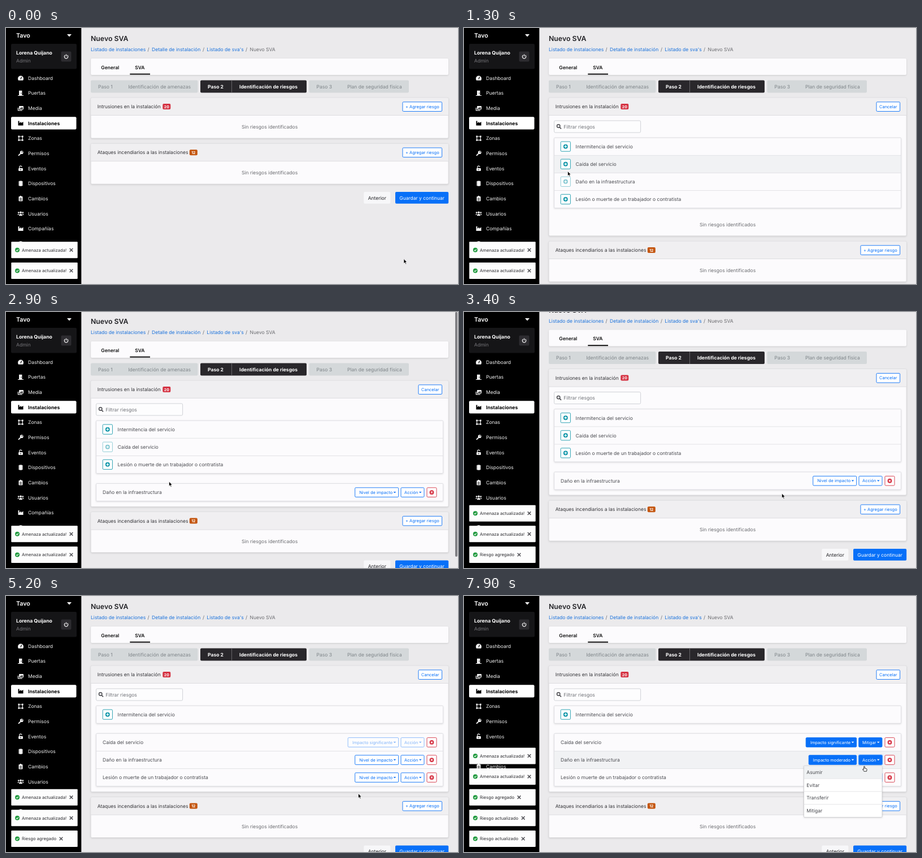
Animation of 800x453 px, one loop 8000 ms. Source, as an HTML page:

```html
<!DOCTYPE html>
<html lang="es">
<head>
<meta charset="utf-8">
<title>Nuevo SVA</title>
<style>
  html, body { margin: 0; width: 100%; height: 100%; overflow: hidden; background: #ebeaec; }
  svg { display: block; }
  text { font-family: Inter, "Open Sans", sans-serif; text-rendering: geometricPrecision; white-space: pre; }
  .b { font-weight: 700; }
  .sb { font-weight: 600; }
  .mid { text-anchor: middle; }
  .end { text-anchor: end; }
  .card { filter: drop-shadow(0 1px 1.5px rgba(0, 0, 0, .13)); }
  .line { fill: none; stroke: currentColor; stroke-width: 1.2; }
</style>
</head>
<body>
<svg width="800" height="453" viewBox="0 0 800 453">
  <g id="main"></g>
  <g id="side"></g>
  <g id="toasts"></g>
  <g id="cursor"></g>
</svg>
<script>
const LOOP = 8000, STEP = 100;
const BLUE = '#0870f8', TEAL = '#1699ab', RED = '#d53343', INK = '#3c3c40', GRAY = '#6b6c70';
const ROW = 31.1, ITEM = 22.8, LIST_TOP = 194.2;

// Drawing helpers; y of text is the middle of its capitals
const txt = (x, y, s, fill = INK, size = 8.55, cls = '') =>
  `<text x="${x}" y="${y + size * .36}" font-size="${size}" fill="${fill}" class="${cls}">${s}</text>`;
const rect = (x, y, w, h, fill, r = 0, more = '') =>
  `<rect x="${x}" y="${y}" width="${w}" height="${h}" rx="${r}" fill="${fill}" ${more}/>`;
const path = (d, more = '') => `<path d="${d}" ${more}/>`;
const stroke = (c, w = 1) => `stroke="${c}" stroke-width="${w}"`;
const hline = (x, y, w, c = '#dddde1') => rect(x, y - .4, w, .8, c);
const at = (x, y, s, color = '#fff') =>
  `<g transform="translate(${x} ${y})" fill="${color}" color="${color}">${s}</g>`;
const dot = (x, y, r) => `<circle cx="${x}" cy="${y}" r="${r}"/>`;
const cross = (r, c, w) => path(`M${-r} ${-r}L${r} ${r}M${r} ${-r}L${-r} ${r}`, `fill="none" ${stroke(c, w)}`);

// ---- Sidebar ----
const plant = path('M-4.5-4h2v3.8L.8-2.5v2.3l3.7-2.3V4h-9z');
const icons = {
  gauge: path('M-5 1a5 5 0 0 1 10 0q0 2-.9 3.2h-8.2Q-5 3-5 1z') + path('M-.2 2L1.7-2', stroke('#000', 1.2)),
  door: path('M-3-4.6h5.4v8.4H5v1H-5v-1h2z') + rect(.4, -.4, 1, 1.3, '#000'),
  media: path('M-4.6-1v5h7.4', 'class="line"') + rect(-3, -4, 8, 6.3, 'currentColor', 1) +
    path('M-1.8 1.2L0-1l1 1 1.6-2 1.5 3.2z', 'fill="#000"'),
  plant,
  zone: path('M-3.2-3.2h6.4v6.4h-6.4z', 'class="line"') +
    [[-4.6, -4.6], [2, -4.6], [-4.6, 2], [2, 2]].map(p => rect(...p, 2.6, 2.6, 'currentColor')).join(''),
  key: dot(1.7, -1.7, 2.9) + path('M0 0L-4 4', 'class="line" style="stroke-width:2"') +
    `<circle cx="2.5" cy="-2.5" r=".9" fill="#000"/>`,
  lock: rect(-3.9, -.4, 7.8, 5, 'currentColor', 1) + path('M-2.2 0v-2a2.1 2.1 0 0 1 4.2-.6', 'class="line"') +
    rect(-.6, 1.2, 1.2, 1.8, '#000'),
  chip: rect(-2.7, -4.6, 5.4, 9.2, 'currentColor', 1) +
    path('M-4-3h8M-4-1h8M-4 1h8M-4 3h8', 'class="line" style="stroke-width:1"'),
  board: rect(-3.5, -3.8, 7, 8.6, 'currentColor', 1) + dot(0, -3.8, 1.3) +
    path('M-1.8-.6h3.6M-1.8 1.2h3.6M-1.8 3h3.6', stroke('#000', .8)),
  users: dot(0, -2, 1.9) + dot(-3.8, -1.8, 1.3) + dot(3.8, -1.8, 1.3) +
    path('M-3 3.8Q-3 .6 0 .6t3 3.2zM-5.6 2.4Q-5.4 0-3 .2l-.8 2.2zM5.6 2.4Q5.4 0 3 .2l.8 2.2z'),
  round: dot(0, 0, 4.6)
};
const menu = [['gauge', 'Dashboard'], ['door', 'Puertas'], ['media', 'Media'], ['plant', 'Instalaciones'],
  ['zone', 'Zonas'], ['key', 'Permisos'], ['lock', 'Eventos'], ['chip', 'Dispositivos'],
  ['board', 'Cambios'], ['users', 'Usuarios'], ['plant', 'Compañías'], ['round', '']];

function sidebar() {
  let s = rect(0, 0, 133.3, 453, '#000') +
    txt(18, 13.2, 'Tavo', '#fff', 10.7, 'sb') + path('M108 11h8l-4 4.4z', 'fill="#fff"') +
    rect(9, 28, 116, 44.5, '#151517', 2) +
    txt(18, 44, 'Lorena Quijano', '#fff', 8.7, 'b') + txt(18, 57.5, 'Admin', '#77767b') +
    rect(97.5, 41.5, 18, 18, '#2d2c30', 2) +
    at(106.5, 50.5, path('M-1.9-2.4a3.2 3.2 0 1 0 3.8 0M0-4v3.8', 'class="line"'));
  menu.forEach(([icon, label], i) => {
    const y = 88.6 + 26.65 * i, on = i === 3, c = on ? '#000' : '#f2f2f2';
    if (on) s += rect(9, y - 11.4, 115.5, 22.4, '#fff', 2);
    s += at(26, y, icons[icon], c) + txt(39, y, label, c, on ? 8.65 : 8.55, on ? 'b' : '');
  });
  return s;
}

const toastKinds = [['Amenaza actualizada!', 115.5], ['Riesgo agregado', 97.5], ['Riesgo actualizado', 104.7]];
const toastOrder = [0, 0, 1, 2, 2];

function toasts(n) {
  return toastOrder.slice(0, n).map((k, i) => {
    const y = 429.5 - (n - 1 - i) * 36.65, [label, x] = toastKinds[k];
    return rect(9.3, y - 14.5, 117.4, 29, '#fdfdfd', 1) +
      at(20, y, dot(0, 0, 4) + path('M-2 .1L-.5 1.5 2-1.2', `fill="none" ${stroke('#fff', 1.1)}`), '#219a3f') +
      txt(28, y, label, '#2c2c30', 7.65) + at(x, y, cross(2.8, '#505055', 1.5));
  }).join('');
}

// ---- Timeline ----
const risks = ['Intermitencia del servicio', 'Caída del servicio', 'Daño en la infraestructura',
  'Lesión o muerte de un trabajador o contratista'];
const impacts = ['insignificante', 'menor', 'moderado', 'significante', 'catastrófico'].map(s => 'Impacto ' + s);
const actions = ['Asumir', 'Evitar', 'Transferir', 'Mitigar'];
const OPEN = 700;
const addedAt = [Infinity, 4100, 1500, 4500];
const saving = [[1200, 1500, 2], [2700, 3200, 1], [3900, 4100, 1], [4300, 4500, 3]];
const menus = [[4700, 5100, 1, 'impact'], [5600, 6100, 1, 'action'], [6600, 7100, 2, 'impact'], [7700, 8000, 2, 'action']];
const picks = { impact: { 1: [5100, 5300, impacts[3]], 2: [7100, 7300, impacts[2]] },
  action: { 1: [6100, 6300, 'Mitigar'] } };
const toastAt = [0, 0, 3000, 5500, 6300];
const scrollKeys = [[0, 0], [2700, 0], [2900, 2], [3200, 22.4], [3400, 22.4], [3600, 0]];
const mouseKeys = [[0, 704, 408.5], [200, 704, 400], [600, 742, 140], [800, 742, 140], [1100, 180, 272],
  [1200, 180, 272], [1300, 183.5, 253.5], [1700, 181, 241], [2700, 181, 241], [2900, 288.5, 300],
  [3400, 562.5, 321], [3600, 500, 305], [3900, 180, 241], [4300, 181, 241], [4650, 656, 259], [4750, 656, 259],
  [5100, 623.5, 349.5], [5200, 623.5, 349.5], [5500, 719, 259], [5700, 719, 260], [6000, 690, 349],
  [6150, 690, 349], [6400, 680.5, 289.5], [6650, 680, 290], [6950, 650, 357], [7100, 650, 357],
  [7500, 712, 290], [7750, 712, 290], [7900, 708.5, 301.2]];

function along(keys, t) {
  const i = keys.findIndex(k => k[0] > t);
  if (i < 0) return keys[keys.length - 1].slice(1);
  const a = keys[i - 1], b = keys[i], p = (t - a[0]) / (b[0] - a[0]), e = p * p * (3 - 2 * p);
  return a.slice(1).map((v, j) => v + (b[j + 1] - v) * e);
}
const during = (list, t) => list.find(([from, to]) => t >= from && t < to);

// ---- Main area ----
let mx, my, hand;
const over = (x, y, w, h) => mx >= x && mx < x + w && my >= y && my < y + h;
const link = (x, y, w, h) => { const o = over(x, y, w, h); hand = hand || o; return o; };

function button(x, y, w, label) {
  const o = link(x, y - 8.3, w, 16.6);
  return rect(x, y - 8.3, w, 16.6, o ? BLUE : '#fff', 1.5, stroke(BLUE, .9)) +
    txt(x + w / 2, y, label, o ? '#fff' : BLUE, 7.5, 'mid');
}

const widths = { 'Nivel de impacto': 77, [impacts[2]]: 84.5, [impacts[3]]: 89.5, 'Acción': 41, 'Mitigar': 41.3 };

function select(right, y, label, solid, dim, focus, covered) {
  const w = widths[label], x = right - w;
  const on = solid || focus || (!covered && !dim && link(x, y - 8.3, w, 16.6));
  const c = on ? '#fff' : BLUE;
  return `<g opacity="${dim ? .5 : 1}">` +
    (focus ? rect(x - 1.5, y - 9.8, w + 3, 19.6, '#9cc6fb', 3) : '') +
    rect(x, y - 8.3, w, 16.6, on ? BLUE : '#fff', 1.5, stroke(BLUE, .9)) +
    txt(right - 10.6, y, label, c, 7.45, 'end') +
    path(`M${right - 9} ${y - 1.2}h4.6l-2.3 2.5z`, `fill="${c}"`) + '</g>';
}

function panel(y, h, title, badge, bx, color) {
  return `<g class="card">${rect(150.2, y, 632.8, h, '#fcfbfd', 2, stroke('#d9d9dc', .7))}</g>` +
    rect(150.5, y + .3, 632.2, 31, '#f0eff1', 2) + hline(150.2, y + 31.2, 632.8, '#d9d9dc') +
    txt(161.7, y + 15.8, title, '#333337') + rect(bx, y + 10.6, 14, 10, color, 2) +
    txt(bx + 7, y + 15.7, badge, '#fff', 6.8, 'b mid');
}

const listBox = (y, n) => `<g class="card">${rect(159.6, y, 614, n * ROW, '#fcfbfd', 1.5, stroke('#d9d9dd', .8))}</g>`;
const rowBack = (y, i, hover) => (hover ? rect(160, y + .4, 613.2, ROW - .8, '#f1f2f4') : '') +
  (i ? hline(159.6, y, 614) : '');

function catalog(t, rows) {
  const busy = during(saving, t);
  let s = rect(159.6, 164, 153, 21, '#fdfdfe', 2, stroke('#cacdd2', .9)) +
    at(168, 174.3, `<circle cx="-.8" cy="-.8" r="2.7" class="line" style="stroke-width:1.5"/>` +
      path('M1.2 1.2L4 4', 'class="line" style="stroke-width:1.7"'), '#4a4a4f') +
    txt(176.3, 174.6, 'Filtrar riesgos', '#707277') + listBox(LIST_TOP, rows.length);
  rows.forEach((r, i) => {
    const y = LIST_TOP + i * ROW, c = y + ROW / 2, dim = busy && busy[2] === r;
    link(171, c - 9, 17.6, 17.6);
    s += rowBack(y, i, over(160, y, 613, ROW)) + `<g opacity="${dim ? .5 : 1}">` +
      rect(171.2, c - 8.7, 17.2, 17.2, '#fff', 1.5, stroke(TEAL, .9)) +
      at(179.8, c - .1, dot(0, 0, 4) + path('M-2.3 0h4.6M0-2.3v4.6', stroke('#fff', 1.3)), TEAL) + '</g>' +
      txt(197.6, c + .2, risks[r], '#4a4b50');
  });
  return s;
}

function chosen(t, rows, top, open) {
  let s = listBox(top, rows.length);
  rows.forEach((r, i) => {
    const y = top + i * ROW, c = y + ROW / 2 + .1;
    const made = kind => { const p = picks[kind][r]; return p && t >= p[0] ? p : null; };
    const im = made('impact'), ac = made('action');
    const dim = [im, ac].some(p => p && t < p[1]);
    const focus = kind => open && open[2] === r && open[3] === kind;
    s += rowBack(y, i, open ? open[2] === r : over(160, y, 613, ROW)) +
      txt(171, c, risks[r], '#4a4b50') +
      select(694.7, c, im ? im[2] : 'Nivel de impacto', im && t >= im[1], dim, focus('impact'), open) +
      select(740, c, ac ? ac[2] : 'Acción', ac && t >= ac[1], dim, focus('action'), open) +
      rect(745, c - 8.3, 17, 16.6, '#fff', 1.5, stroke(RED, .9)) +
      at(753.5, c, dot(0, 0, 3.9) + cross(1.4, '#fff', 1.2), RED);
  });
  return s;
}

function dropdown(kind, c) {
  const items = kind === 'impact' ? impacts : actions, x = kind === 'impact' ? 556.2 : 601.5, y = c + 10.4;
  let s = `<g class="card">${rect(x, y, 138.5, items.length * ITEM, '#fff', 1.5, stroke('#c8c8cc', .8))}</g>`;
  items.forEach((label, i) => {
    const iy = y + i * ITEM;
    if (link(x, iy, 138.5, ITEM)) s += rect(x + .4, iy + .4, 137.7, ITEM - .8, '#eff1f3');
    if (i) s += hline(x, iy, 138.5);
    s += txt(x + 4.8, iy + ITEM / 2, label, '#47484d');
  });
  return s;
}

function heading() {
  const crumbs = [[150, 'Listado de instalaciones'], [258, 'Detalle de instalación'], [355.3, "Listado de sva's"]];
  const step = (x, w, n, nx, label, lx, on) => {
    const c = on ? '#fff' : '#7e8488', cls = on ? 'b' : '';
    return rect(x, 92.5, w, 22, on ? '#29272b' : '#d4d8da', 2) +
      txt(nx, 103.7, 'Paso ' + n, c, 8.55, cls) + txt(lx, 103.7, label, c, 8.55, cls);
  };
  return txt(150, 18.6, 'Nuevo SVA', '#222226', 12.3, 'sb') +
    crumbs.map(([x, s]) => txt(x, 38.3, s, '#1a72dc')).join('') +
    [250.6, 348, 424].map(x => txt(x, 38.3, '/', GRAY)).join('') + txt(431.6, 38.3, 'Nuevo SVA', GRAY) +
    `<g class="card">${rect(150.2, 54, 632.8, 29, '#fcfbfd', 2)}</g>` +
    txt(168.3, 69.7, 'General', '#111', 8.5, 'sb') + txt(228.3, 69.7, 'SVA', '#111', 8.5, 'sb') +
    rect(219.3, 80.6, 35.7, 2, '#111') +
    step(150, 189.5, 1, 163, 'Identificación de amenazas', 216.3) +
    step(344, 188, 2, 357, 'Identificación de riesgos', 413, true) + rect(399, 92.5, .8, 22, '#77757a') +
    step(536.5, 176.5, 3, 549.5, 'Plan de seguridad física', 604);
}

function page(t) {
  const isOpen = t >= OPEN, open = during(menus, t);
  const left = risks.map((_, i) => i).filter(i => t < addedAt[i]);
  const taken = risks.map((_, i) => i).filter(i => t >= addedAt[i]);
  const listEnd = LIST_TOP + left.length * ROW, top = listEnd + 18;
  const none = y => txt(466.6, y, 'Sin riesgos identificados', GRAY, 8.55, 'mid');
  const bottom = !isOpen ? 195 : taken.length ? top + taken.length * ROW + 9.8 : listEnd + 49.2;
  const next = bottom + 9.6, foot = next + 95.8;

  let s = heading() + panel(123.4, bottom - 123.4, 'Intrusiones en la instalación', 20, 277.3, RED);
  if (isOpen) s += button(730, 139.2, 41.6, 'Cancelar') + catalog(t, left);
  else s += button(702, 139.2, 69.6, '+ Agregar riesgo');
  s += taken.length ? chosen(t, taken, top, open) : none(isOpen ? listEnd + 29.2 : 175);
  s += panel(next, 71.5, 'Ataques incendiarios a las instalaciones', 12, 324.8, '#c4560f') +
    button(702, next + 15.7, 69.6, '+ Agregar riesgo') + none(next + 51.8);
  s += rect(633.3, foot - 10.4, 47, 20.8, '#f7f7f9', 2) + txt(656.8, foot + .2, 'Anterior', '#222226', 8.5, 'mid') +
    rect(689, foot - 10.4, 94.2, 20.8, BLUE, 2) + txt(736.2, foot + .2, 'Guardar y continuar', '#fff', 8.5, 'mid');
  if (open) s += dropdown(open[3], top + (taken.indexOf(open[2]) + .5) * ROW);
  return s;
}

const arrow = path('M0 0v8.2l1.9-1.7 1.3 3 1.4-.6-1.3-2.9h2.5z', `fill="#000" ${stroke('#fff', .7)}`);
const finger = path('M-.8.6q.8-1 1.6 0v3l3 .8q1 .4.8 1.6l-.6 3h-4.6l-2.2-3q-.4-1 .6-1l1.4.8z',
  `fill="#fff" ${stroke('#000', .8)}`);

const put = (id, s) => { document.getElementById(id).innerHTML = s; };

function draw(t) {
  const [x, y] = along(mouseKeys, t), [scroll] = along(scrollKeys, t);
  mx = x; my = y + scroll; hand = false;
  const bar = t >= 2800 && t < 3300 ? rect(795, scroll ? scroll - 2 : 0, 4, 433, '#7f7f83', 2) : '';
  put('main', `<g transform="translate(0 ${-scroll})">${page(t)}</g>` + bar);
  put('toasts', toasts(toastAt.filter(a => t >= a).length));
  put('cursor', at(x, y, hand ? finger : arrow));
}

let shown = -1;
function tick() {
  const t = Math.floor(performance.now() % LOOP / STEP) * STEP;
  if (t !== shown) draw(shown = t);
  requestAnimationFrame(tick);
}
put('side', sidebar());
tick();
</script>
</body>
</html>
```
